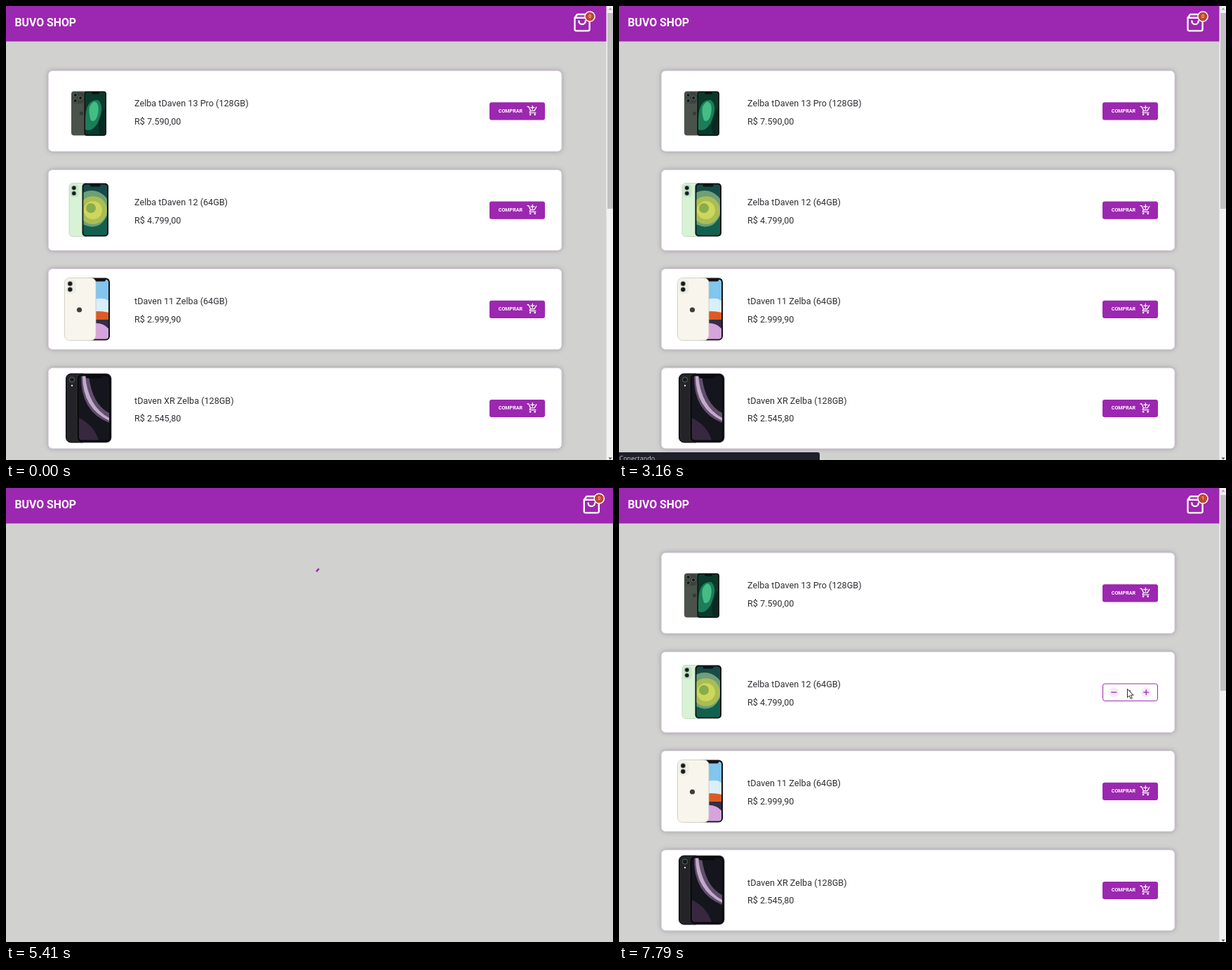
An HTML page that plays this animation: 865 by 647 pixels, repeating every 8 s.

```html
<!DOCTYPE html>
<html lang="pt-BR">
<head>
<meta charset="utf-8">
<title>BUVO SHOP</title>
<style>
  html, body { margin: 0; width: 100%; height: 100%; overflow: hidden; background: #d1d1cf; }
  svg { display: block; width: 865px; height: 647px; font-family: Roboto, Arial, sans-serif; }
  .item { font-size: 12.64px; fill: #303036; }
  .buy { font-size: 7.1px; font-weight: 700; fill: #fff; }
  .status { font: 9px "Open Sans", "Noto Sans", sans-serif; fill: #c9c9cf; }
  .line { fill: none; stroke: #fff; stroke-width: 2; stroke-linejoin: round; stroke-linecap: round; }
</style>
</head>
<body>
<svg id="stage" viewBox="0 0 865 647"></svg>
<script>
const LOOP = 8000, PURPLE = '#9c27b0', ROW = 141.2;

const box = (x, y, w, h, r, fill, extra = '') =>
  `<rect x="${x}" y="${y}" width="${w}" height="${h}" rx="${r}" fill="${fill}" ${extra}/>`;
const dot = (x, y, r, fill, extra = '') =>
  `<circle cx="${x}" cy="${y}" r="${r}" fill="${fill}" ${extra}/>`;
const path = (d, fill, extra = '') => `<path d="${d}" fill="${fill}" ${extra}/>`;
const lens = (x, y, r) => dot(x, y, r, '#151b1d', 'stroke="#8b9690" stroke-width=".6"');
const clip = (id, x, y, w, h, r) => `<clipPath id="${id}">${box(x, y, w, h, r, '#000')}</clipPath>`;

// Phones, in stage coordinates
const phones = [
  box(93, 121.5, 24, 63, 4, '#4b524b') + box(94.5, 123, 16, 16, 4, '#3a423c') +
  lens(98.7, 127, 2.7) + lens(98.7, 135, 2.7) + lens(106.2, 131, 2.7) +
  dot(107.5, 153, 2.6, '#343b36') +
  box(111.5, 121.5, 31.5, 63.5, 4, '#0b0f0e') +
  clip('s0', 113, 123, 28.5, 60.5, 3) +
  `<g clip-path="url(#s0)">${box(113, 123, 29, 61, 0, '#0a3a2c') +
  path('M113 164Q113 132 131 134Q142 142 130 168Q122 180 113 176Z', '#1c7d58') +
  path('M121 163Q114 142 126 136Q134 139 131 154Q128 167 121 163Z', '#43bd84') +
  path('M141 146Q128 164 134 184H142Z', '#082a22')}</g>` + box(122, 122, 11, 3.4, 1.6, '#0b0f0e'),

  box(90, 252.5, 28, 76, 5, '#d8f2d6', 'stroke="#b4ccb4" stroke-width=".7"') +
  box(91.6, 254.5, 12, 18, 4, '#c8e6c6') + lens(96.8, 259.3, 3) + lens(96.8, 267, 3) +
  box(108.5, 252.5, 37.5, 76, 5, '#0e1514') +
  clip('s1', 110.5, 254.5, 33.5, 72, 3.5) +
  `<g clip-path="url(#s1)">${box(110, 254, 35, 73, 0, '#174b47') +
  dot(122, 289, 26, '#6e9f78') + dot(124, 291, 20, '#a9bd55') + dot(124, 291, 13, '#ced65c') +
  dot(121, 288, 7, '#87ad4c') + path('M110 311Q134 323 145 296V328H110Z', '#12604f')}</g>` +
  box(119.5, 253.5, 15, 4, 2, '#0e1514'),

  box(112, 387.5, 36, 89, 6, '#121216') +
  clip('s2', 114, 390, 32, 84.5, 4) +
  `<g clip-path="url(#s2)">${box(114, 389, 33, 86, 0, '#82c5ee') +
  path('M114 422Q138 412 147 421V438H114Z', '#d9effa') +
  path('M114 437Q132 433 147 437V447H114Z', '#de5a24') +
  path('M114 447H147V475H114Z', '#332f45') +
  path('M114 455Q136 447 147 461V475H114Z', '#d7a3dc')}</g>` + box(126, 388, 16, 4.5, 2, '#121216') +
  box(83.5, 387.5, 44.5, 89, 7, '#f8f5ec', 'stroke="#cbc7bd" stroke-width=".8"') +
  box(85.5, 390, 14, 20, 5, '#efede3') + lens(91.3, 395.8, 3.3) + lens(91.3, 404, 3.3) +
  dot(104.5, 433, 3.6, '#403e3c'),

  box(85.5, 524, 30, 98, 7, '#242428', 'stroke="#09090b"') + lens(94, 532.5, 3.6) +
  dot(94, 541, 1.2, '#ddd') +
  box(101, 524, 49, 98, 7, '#0b0b0e', 'stroke="#3b3b40" stroke-width=".7"') +
  clip('s3', 104, 527.5, 43, 91, 4) +
  `<g clip-path="url(#s3)">${box(104, 527, 43, 92, 0, '#15151e') +
  path('M107 527Q106 578 147 594V580Q123 568 118 527Z', '#5f4f6b') +
  path('M109 527Q109 573 147 591V587Q117 571 113 527Z', '#c3aacb') +
  path('M104 587Q126 598 132 619H104Z', '#37283f')}</g>` + box(114, 526, 23, 4.5, 2, '#0b0b0e')
];

const items = [
  ['Zelba tDaven 13 Pro (128GB)', 'R$ 7.590,00'],
  ['Zelba tDaven 12 (64GB)', 'R$ 4.799,00'],
  ['tDaven 11 Zelba (64GB)', 'R$ 2.999,90'],
  ['tDaven XR Zelba (128GB)', 'R$ 2.545,80']
];

const button = i => `<g id="buy${i}">${box(689, 137.3, 79, 25.2, 3, PURPLE)}
  <text class="buy" x="701.8" y="151.5">COMPRAR</text>
  <path class="line" transform="translate(742.4 141.4) scale(.66)" stroke-linecap="butt"
    d="M1 3H3.6L7.8 12H16L20.3 4.4M7.5 12L6 15Q5.4 16.2 6.8 16.2H19M12 1V9M8 5H16"/>
  ${dot(747.1, 154.6, 1.3, '#fff') + dot(753.7, 154.6, 1.3, '#fff')}</g>`;

const row = ([name, price], i) => `<g transform="translate(0 ${i * ROW})">
  ${box(60.3, 92.2, 731.6, 115, 6, '#fff', 'filter="url(#shadow)" stroke="#d8c6de" stroke-width=".7"')}
  <g id="text${i}" class="item"><text x="183" y="143">${name}</text><text x="183" y="168.8">${price}</text></g>
  ${button(i)}</g><g id="phone${i}">${phones[i]}</g>`;

const counter = `<g id="counter">
  ${box(689.5, 279, 78, 24.4, 3, '#fff', `stroke="${PURPLE}"`)}
  ${dot(705.3, 291.2, 7, '#f3eaf6') + dot(751.2, 291.2, 7, '#f3eaf6')}
  <text x="728.5" y="294.6" font-size="9.5" text-anchor="middle" fill="${PURPLE}">1</text>
  <path d="M701.3 291.2h8M747.2 291.2h8M751.2 287.2v8" stroke="${PURPLE}" stroke-width="1.3"/></g>`;

stage.innerHTML = `
  <filter id="shadow" x="-5%" y="-20%" width="110%" height="140%">
    <feDropShadow dx="0" dy="0" stdDeviation="3" flood-color="#554a62" flood-opacity=".45"/></filter>
  ${box(0, 0, 865, 647, 0, '#d1d1cf') + box(0, 0, 865, 50.5, 0, PURPLE)}
  <text x="12.5" y="29.3" font-size="15.8" font-weight="700" fill="#fff">BUVO SHOP</text>
  <g id="bag">
    <path class="line" transform="translate(807 9.7) scale(1.17)"
      d="M6 2L3 6V20A2 2 0 0 0 5 22H19A2 2 0 0 0 21 20V6L18 2ZM3 6H21M16 10A4 4 0 0 1 8 10"/>
    ${dot(832, 15, 7.1, '#c2462c', 'stroke="#fff" stroke-width="1.5"')}
    <text id="count" x="832" y="17.3" font-size="6.4" text-anchor="middle" fill="#fff">0</text>
  </g>
  <g id="list">${items.map(row).join('')}${counter}
    ${box(855.5, 0, 10, 647, 0, '#f1f1f1') + box(857, 10, 8, 279, 0, '#c1c1c1')}
    ${path('M858.5 5.5L861 2.5L863.5 5.5Z', '#a3a3a3') + path('M858.5 643.5L861 646.5L863.5 643.5Z', '#505050')}
  </g>
  <circle id="spinner" r="14.7" fill="none" stroke="${PURPLE}" stroke-width="2.6" pathLength="126.9"/>
  <g id="blank">${box(0, 0, 865, 647, 0, '#1a191f')}</g>
  <g id="status">${path('M0 636H283Q286 636 286 639V647H0Z', '#20202b')}
    <text class="status" x=".5" y="648">Conectando...</text></g>
  <g id="arrow">${path('M.5 .5V12.6L3.3 10L5.2 14.4L7.2 13.5L5.3 9.2H9Z', '#fff', 'stroke="#111" stroke-width=".9"')}</g>
  <g id="hand">${path('M-1.3 .8Q0 -.8 1.3 .8V6Q3 5 3.8 6.4Q5.5 5.6 6.2 7.1Q8 6.5 8.2 8.5V11.5L6.8 16H-1.4L-5 9.8Q-4.6 7.8-2.8 9L-1.3 10.5Z', '#fff', 'stroke="#111" stroke-width=".9" stroke-linejoin="round"')}</g>`;

const $ = id => document.getElementById(id);
const show = (id, on) => $(id).setAttribute('visibility', on ? 'visible' : 'hidden');
const move = (id, x, y) => $(id).setAttribute('transform', `translate(${x} ${y})`);
const within = (t, a, b) => t >= a && t < b;
const clamp = x => Math.max(0, Math.min(1, x));
const smooth = x => x * x * (3 - 2 * x);
const easeOut = x => 1 - (1 - x) ** 2;

// Growing and shrinking arc on a turning ring, 1.4 s per turn
function spin(t) {
  const tick = Math.floor((Math.min(t, 5410) - 4810) / 75) * 75;
  const p = (0.65 + tick / 1400) % 1;
  const grow = smooth(clamp(p * 2)), trail = smooth(clamp(p * 2 - 1));
  $('spinner').setAttribute('stroke-dasharray', `${1 + 99 * grow} 200`);
  $('spinner').setAttribute('stroke-dashoffset', -15 * grow - 110 * trail);
  $('spinner').setAttribute('transform', `translate(433.2 107.3) rotate(${360 * p})`);
}

function pointer(t) {
  if (t < 1610) {
    const p = Math.floor((t - 1000) / 67.8) / 8;
    return [708 + 123 * easeOut(p), 638 - 615 * p];
  }
  if (t < 7320) {
    const p = easeOut(clamp(Math.floor((t - 6460) / 65.8) / 12));
    return [832 - 103 * p, 1 + 260 * p];
  }
  const p = easeOut(clamp(Math.floor((t - 7320) / 67) / 3));
  return [727 - 3 * p, 281 + 5 * p];
}

function draw(now) {
  const t = now % LOOP;
  const loading = within(t, 4600, 5750), bought = t >= 7520, hover = within(t, 7320, 7520);
  $('list').style.display = loading ? 'none' : '';
  move('bag', loading ? 13.3 : 0, 0);
  show('blank', within(t, 4600, 4810));
  show('status', within(t, 3160, 5035));
  show('spinner', within(t, 4810, 5750));
  spin(Math.max(t, 4810));

  items.forEach((_, i) => {
    const ready = !within(t, 4600, i < 2 ? 5880 : 5940);
    show('phone' + i, ready);
    move('text' + i, ready ? 0 : -12.4, 0);
  });

  show('buy1', !bought);
  $('buy1').firstElementChild.setAttribute('fill', hover ? '#7b1fa2' : PURPLE);
  show('counter', bought);
  $('count').textContent = bought ? 1 : 0;

  const [x, y] = pointer(t);
  show('arrow', within(t, 1000, 1610) || within(t, 6460, 7320) || bought);
  show('hand', hover);
  move('arrow', x, y);
  move('hand', x, y);
  requestAnimationFrame(draw);
}
requestAnimationFrame(draw);
</script>
</body>
</html>
```
